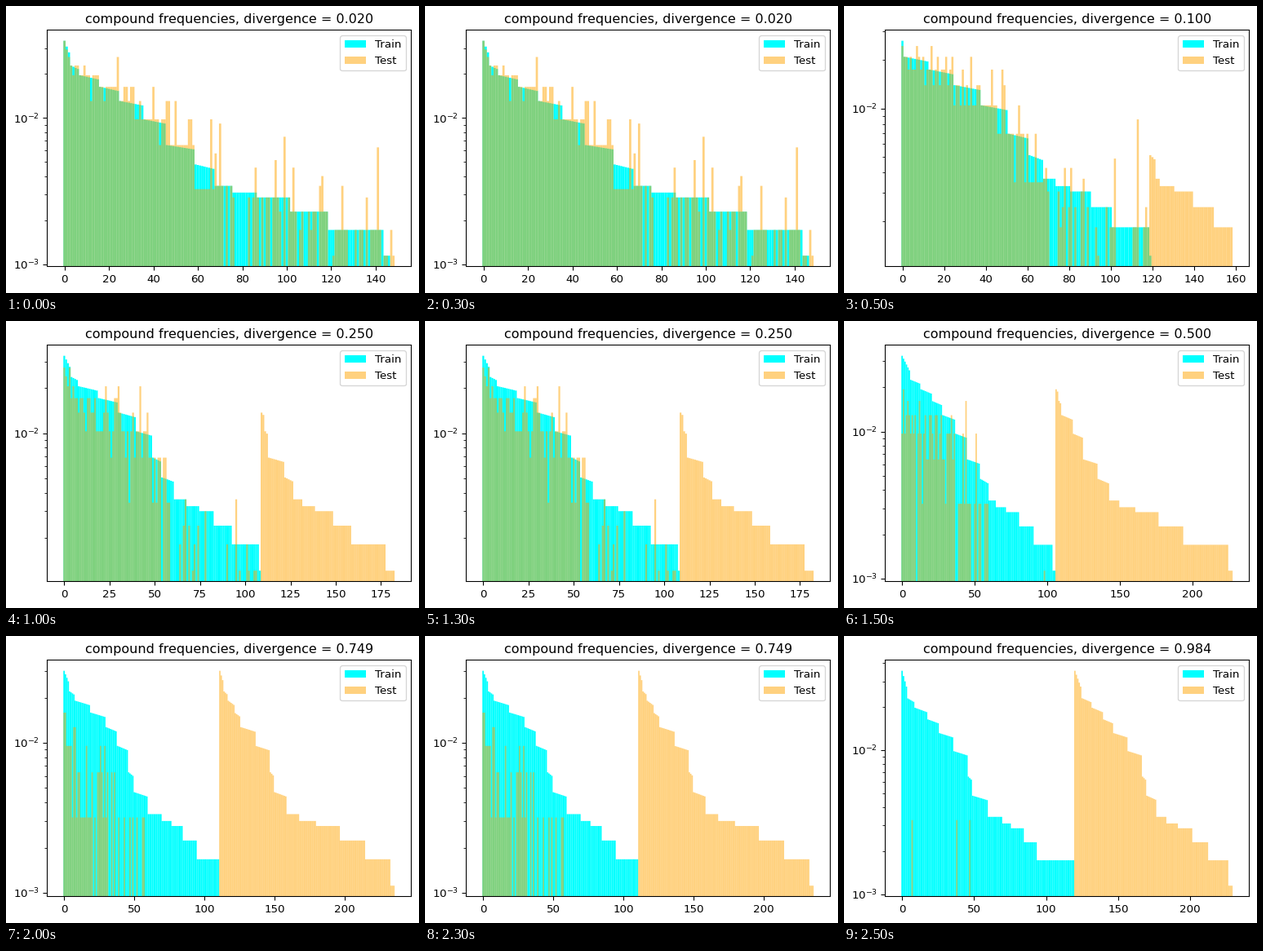
Recreate the animation shown at these times as a matplotlib script. Size 506 px wide and 352 px high, loop 3 s.

```python
import numpy as np
import matplotlib.pyplot as plt
from matplotlib.animation import FuncAnimation

W, H, DPI = 506, 352, 96

# Bars fall in plateaus. LEVELS are their heights in units of 3 * lo;
# PLACES say where each plateau ends, as a position among a series' key ranks.
LEVELS = np.array([7.6, 6.65, 5.7, 4.75, 3.8, 2.85, 1.9, 1.4,
                   1, 0.9, 5 / 6, 2 / 3, 1 / 2, 1 / 3])
PLACES = [0.4, 1, 1.5, 2, 2.5, 3, 4, 4.5, 5, 5.25, 5.6, 6, 7, 8]

# train: key ranks of the sorted bars; tail: the same for test-only bars
SCENES = [
    dict(div=0.020, lo=1.147e-3, hi=0.03375, step=20,
         train=[0, 7, 25, 46, 59, 76, 119, 144, 147],
         tail=[147] * 7 + [148, 149]),
    dict(div=0.100, lo=1.221e-3, hi=0.02625, step=20,
         train=[0, 1, 25, 51, 61, 74, 101, 119, 120],
         tail=[119] * 5 + [124, 150, 159, 159]),
    dict(div=0.250, lo=1.203e-3, hi=0.0329, step=25,
         train=[0, 8, 30, 49, 54, 68, 93, 108, 109],
         tail=[109] * 3 + [113, 122, 132, 159, 178, 183]),
    dict(div=0.500, lo=1.132e-3, hi=0.0327, step=50,
         train=[0, 13, 28, 45, 54, 65, 91, 104, 106],
         tail=[106, 106, 110, 125, 135, 150, 194, 225, 228]),
    dict(div=0.749, lo=1.115e-3, hi=0.0302, step=50,
         train=[0, 8, 30, 46, 50, 70, 95, 111, 111],
         tail=[111, 117, 126, 147, 150, 168, 215, 233, 236]),
    dict(div=0.984, lo=1.149e-3, hi=0.03546, step=50,
         train=[0, 9, 26, 46, 49, 70, 94, 120, 120],
         tail=[120, 132, 147, 167, 170, 184, 213, 227, 230]),
]


def plateaus(keys, lo, hi):
    """Bar heights from the first key rank to the last."""
    ends = np.interp(PLACES, range(len(keys)), keys)
    starts = np.append(keys[0], ends[:-1])
    rank = np.arange(keys[0], keys[-1])
    k = np.searchsorted(ends, rank, side="right")
    t = (rank - starts[k]) / (ends[k] - starts[k])
    level = LEVELS[k]
    flat = 3 * lo * level * np.where(level > 1, 1 - 0.07 * t, 1)
    head = hi * (3 * lo * LEVELS[0] / hi) ** t
    return np.where(k == 0, head, flat)


def shared_bars(train, scene, rng):
    """Test bars over the train bars: whole counts, fewer as divergence grows."""
    keep = 1 - scene["div"]
    base = 3 * scene["lo"]
    test = np.zeros(len(train))
    for i, top in enumerate(train):
        common = top > 1.2 * base
        if not common and rng.random() > 0.6 * keep ** 3:
            continue
        unit = 0.95 * base if common else base / 6
        count = rng.binomial(round(top / unit), keep)
        if rng.random() < 0.3 * keep ** 2:
            count += np.ceil(base * rng.exponential(0.7) / unit)
        test[i] = min(count * unit, scene["hi"])
    return test


fig = plt.figure(figsize=(W / DPI, H / DPI), dpi=DPI, facecolor="white")
ax = fig.add_axes([50 / W, 32.6 / H, 446.4 / W, 289.92 / H])


def draw(frame):
    scene = SCENES[frame]
    lo, hi = scene["lo"], scene["hi"]
    train = plateaus(scene["train"], lo, hi)
    tail = plateaus(scene["tail"], lo, hi)
    n = scene["tail"][-1]
    test = np.zeros(n)
    test[:len(train)] = shared_bars(train, scene, np.random.default_rng(frame))
    test[scene["tail"][0]:] = tail

    ax.clear()
    style = dict(width=1, log=True, snap=False)
    ax.bar(range(len(train)), train, color="cyan", label="Train", **style)
    ax.bar(range(n), test, color="orange", alpha=0.5, label="Test", **style)
    pad = (hi / lo) ** 0.05
    ax.set_xlim(-0.5 - 0.05 * n, n - 0.5 + 0.05 * n)
    ax.set_ylim(lo / pad, hi * pad)
    ax.set_xticks(range(0, n + 2, scene["step"]))
    ax.set_title(f"compound frequencies, divergence = {scene['div']:.3f}")
    ax.legend(loc="upper right")
    return []


anim = FuncAnimation(fig, draw, frames=len(SCENES), init_func=lambda: [],
                     interval=500, repeat=True, repeat_delay=0)
plt.show()
```
